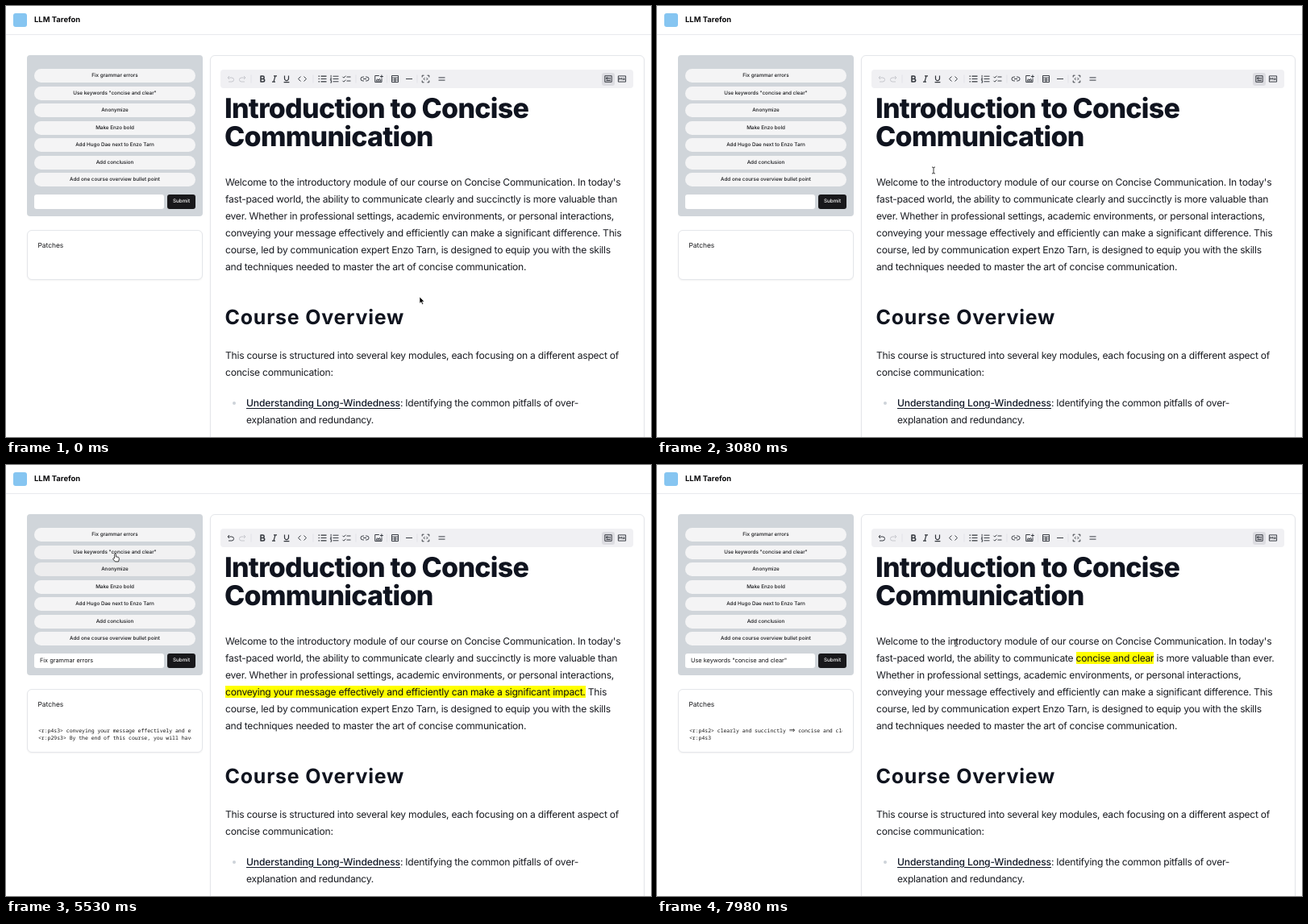
Recreate the animation shown at these times as an HTML page. Size 800x535 px, loop 8000 ms.

```html
<!DOCTYPE html>
<html lang="en">
<head>
<meta charset="utf-8">
<title>Editor demo</title>
<style>
  html, body { margin: 0; width: 100%; height: 100%; overflow: hidden; background: #fff; }
  #stage {
    position: absolute; left: 0; top: 0; width: 800px; height: 535px; overflow: hidden;
    font-family: Inter, "Open Sans", sans-serif; font-optical-sizing: none;
    text-rendering: geometricPrecision; color: #141518;
  }
  #stage div, #stage p, svg { position: absolute; box-sizing: border-box; margin: 0; }
  #stage div, #stage p { white-space: pre; }
  .card { background: #fff; border: 1px solid #e4e6ea; border-radius: 6px; box-shadow: 0 1px 2px #0000000d; }
  .pill { border-radius: 9px; font: 500 6.3px/17px Inter, sans-serif; text-align: center; }
  .body { font-size: 12.1px; line-height: 21px; letter-spacing: -.25px; color: #1a1c22; }
  .body mark { background: #ff0; color: #111; }
  .link { font-weight: 500; letter-spacing: -.13px; color: #111827; text-decoration: underline; text-underline-offset: 2px; }
  .h1 { font-weight: 800; font-size: 34px; line-height: 34.6px; letter-spacing: -.72px; color: #10141f; }
  .h2 { font-weight: 700; font-size: 25px; letter-spacing: .75px; color: #10141f; }
  .mono { font: 6.44px/8.5px "Noto Sans Mono", "Liberation Mono", monospace; overflow: hidden; color: #141414; }
  .mono span { display: inline-block; width: 7.73px; font: 9px/0 "DejaVu Sans", sans-serif; text-align: center; }
  path { fill: none; stroke: #30343b; stroke-width: .95; stroke-linejoin: round; }
</style>
</head>
<body>
<div id="stage"></div>
<script>
const LOOP = 8000;
const stage = document.getElementById("stage");
const clamp = v => Math.max(0, Math.min(1, v));

function add(tag, cls, css, html = "") {
  const el = document.createElement(tag);
  el.className = cls;
  el.style.cssText = css;
  el.innerHTML = html;
  stage.append(el);
  return el;
}
const box = (x, y, w, h, css = "", cls = "", html = "") =>
  add("div", cls, `left:${x}px;top:${y}px;width:${w}px;height:${h}px;${css}`, html);
// One line of text, centred vertically on y
const label = (x, y, html, css = "", cls = "") =>
  add("div", cls, `left:${x}px;top:${y - 15}px;line-height:30px;${css}`, html);
const para = (x, y, html, cls = "body") => add("p", cls, `left:${x}px;top:${y}px`, html);

// Header
box(0, 35, 800, 1, "background:#e8eaed");
box(9, 9, 17, 17, "background:#86c5f1;border-radius:3px");
label(35, 18, "LLM Tarefon", "font-size:9.45px;font-weight:700;color:#09090b");

// Prompt panel
box(26, 61, 217.5, 200, "background:#d0d5da;border-radius:4px");
const pills = [
  "Fix grammar errors", 'Use keywords "concise and clear"', "Anonymize", "Make Enzo bold",
  "Add Hugo Dae next to Enzo Tarn", "Add conclusion", "Add one course overview bullet point"
].map((s, i) => box(35, 78 + 21.5 * i, 200, 17, "", "pill", s));
box(35, 234, 161, 18, "background:#fff;border-radius:3px");
const input = label(42, 242.5, "", "font-size:7.35px");
box(200, 234, 35, 18, "background:#18181b;color:#fff;border-radius:3px", "pill", "Submit");

// Patches card
const card = box(26, 278, 217.5, 62, "", "card");
label(39.5, 298, "Patches", "font-size:8.4px");
const patches = box(40, 326.2, 189.8, 20, "", "mono");

// Document
box(252.5, 61, 539.5, 500, "", "card");
box(265.5, 79, 512.5, 23, "background:#f0f0f3;border-radius:4px");
box(739, 82.5, 16, 16, "background:#dcdce1;border-radius:3px");
para(271, 111.4, "Introduction to Concise\nCommunication", "h1");
const intro = para(272, 208, "");
label(271.5, 387, "Course Overview", "", "h2");
para(272, 422.5, "This course is structured into several key modules, each focusing on a different aspect of\nconcise communication:");
box(281, 490.5, 4, 4, "background:#cdd2d9;border-radius:2px");
para(298, 482, '<span class="link">Understanding Long-Windedness</span>: Identifying the common pitfalls of over-\nexplanation and redundancy.');

// Toolbar icons, each drawn around its centre
const rows = "M-2-3.3H5M-2 0H5M-2 3.3H5";
const icons = [
  [293.5, "M3.5-1.5H-1.5a2.5 2.5 0 000 5H2.5M1.5-3.5L3.5-1.5L1.5.5", "stroke:#c3c5cb"],
  [318, "M-2-3.4H.5a1.65 1.65 0 010 3.3H-2zM-2-.1H.9a1.75 1.75 0 010 3.5H-2z", "stroke-width:1.5"],
  [333, "M-1-3.6H3M-3 3.6H1M1-3.6L-1 3.6", "stroke-width:1.2"],
  [348, "M-2.5-4V-.4a2.5 2.5 0 005 0V-4M-3.4 4.2H3.4", "stroke-width:1.2"],
  [367.5, "M-2-3L-5 0L-2 3M2-3L5 0L2 3"],
  [392.5, rows + "M-5-3.3h1.5M-5 0h1.5M-5 3.3h1.5", "stroke-width:1.2"],
  [407.5, rows + "M-4.4-4.6v2.4M-5.2-1.1h1.4l-1.4 2.1h1.5M-5.2 2.2h1.3v2.4h-1.3"],
  [422.5, "M0-2.5H5M0 2.5H5M-5-2.7l1.4 1.4l2.5-2.5M-5 2.3l1.4 1.4l2.5-2.5"],
  [445, "M-1-2.4H-2.6a2.4 2.4 0 000 4.8H-1M1-2.4H2.6a2.4 2.4 0 010 4.8H1M-2 0H2"],
  [462, "M.8-4H-4.3V4H4V-.3M-3 2.5L-1.4.2L0 1.6L1.4-.2L3 2.5zM3.9-5v4M1.9-3h4"],
  [482.5, "M-4-4H4V4H-4zM-4-1.3H4M-4 1.4H4M0-1.3V4"],
  [500, "M-4 0H4"],
  [520.5, "M-4.3-2V-4.3H-2M2-4.3H4.3V-2M4.3 2V4.3H2M-2 4.3H-4.3V2M-1-1.5L-2.4 0L-1 1.5M1-1.5L2.4 0L1 1.5"],
  [540.5, "M-4-1.6H4M-4 1.6H4"],
  [747, "M-4.2-3.8H4.2V3.8H-4.2zM-2.5-1.6H0V.2H-2.5zM1.3-1.4H2.8M1.3.1H2.8M-2.5 2H2.8"],
  [764, "M-4.6-3.6H4.6V3.6H-4.6zM-3 1.6V-1.5L-1.5.1L0-1.5V1.6M2.4-1.6V1.3M1.2.2L2.4 1.5L3.6.2"]
];
const path = (x, y, d, css = "") => `<path transform="translate(${x} ${y})" d="${d}" style="${css}"/>`;
const dividers = [304, 381, 434, 472.5, 510].map(x => path(x, 90.5, "M0-5V5", "stroke:#e2e2e7")).join("");
const svg = add("div", "", "left:0;top:0",
  `<svg width="800" height="535">${dividers}
  <g id="undo">${path(278.5, 90.5, "M-3.5-1.5H1.5a2.5 2.5 0 010 5H-2.5M-1.5-3.5L-3.5-1.5L-1.5.5", "stroke:inherit")}</g>
  ${icons.map(([x, d, css]) => path(x, 90.5, d, css)).join("")}
  <g id="cursor"></g></svg>`);
const undo = svg.querySelector("#undo");
const cursor = svg.querySelector("#cursor");

const pointers = {
  arrow: path(0, 0, "M0 0V8.2L1.9 6.5L3.2 9.4L4.6 8.8L3.3 5.9H5.9z", "fill:#000;stroke:#fff;stroke-width:.6"),
  hand: path(0, 0, "M-.9 5.2V.6a.9.9 0 011.8 0V3.3L3.8 3.9a1.2 1.2 0 01.9 1.2V7.2L3.9 9.4H-.1L-2.7 6.3a.8.8 0 011.2-1z",
    "fill:#fff;stroke:#111;stroke-width:.8"),
  beam: path(0, 0, "M-2-4Q0-4 0-3V3Q0 4-2 4M2-4Q0-4 0-3M0 3Q0 4 2 4", "stroke:#222;stroke-width:.9")
};

// Pointer track: time, x, y
const track = [
  [70, 513, 361], [700, 400, 262], [980, 400, 262], [1750, 150, 88], [2480, 150, 88],
  [3060, 343, 204], [5250, 343, 204], [5530, 135.5, 110.5], [5740, 129.5, 108.5],
  [7000, 129.5, 108.5], [7560, 371, 221]
];
const kinds = [
  [0, "arrow"], [1940, "hand"], [2560, "arrow"], [2780, "beam"], [5370, "arrow"],
  [5430, "hand"], [7120, "arrow"], [7270, "beam"]
];
// Hovered pill: index, from, to
const hovers = [[0, 1940, 2540], [2, 5400, 5480], [1, 5500, 7090]];

function pointerAt(t) {
  const i = track.findIndex(k => k[0] > t);
  if (i === 0) return track[0].slice(1);
  if (i < 0) return track[track.length - 1].slice(1);
  const [t0, x0, y0] = track[i - 1], [t1, x1, y1] = track[i];
  const u = (t - t0) / (t1 - t0), e = u * u * (3 - 2 * u);
  return [x0 + (x1 - x0) * e, y0 + (y1 - y0) * e];
}

function introText(clear, impact) {
  const end = clear ? "<mark>concise and clear</mark> is more valuable than ever.\n"
    : "clearly and succinctly is more valuable than\never. ";
  const line = "conveying your message effectively and efficiently can make a significant ";
  return "Welcome to the introductory module of our course on Concise Communication. In today's\n" +
    "fast-paced world, the ability to communicate " + end +
    "Whether in professional settings, academic environments, or personal interactions,\n" +
    (impact ? `<mark>${line}impact.</mark>` : line + "difference.") + " This\n" +
    "course, led by communication expert Enzo Tarn, is designed to equip you with the skills\n" +
    "and techniques needed to master the art of concise communication.";
}

// Streamed lines: start, ms per token, text
const runs = [
  [[3230, 18, "<r:p4s3> conveying your message effectively and efficiently"],
   [3500, 21, "<r:p29s3> By the end of this course, you will have"]],
  [[7260, 33, "<r:p4s2> clearly and succinctly ⇒ concise and clear"],
   [7770, 28, "<r:p4s3> conveying"]]
];
function stream(t, [start, step, text]) {
  const [id, ...words] = text.split(" ");
  const tokens = [...id, ...words.map(w => " " + w)];
  return tokens.slice(0, Math.max(0, Math.floor((t - start) / step))).join("")
    .replace("<", "&lt;").replace("⇒", "<span>⇒</span>");
}

function put(el, html) {
  if (el.shown !== html) el.innerHTML = el.shown = html;
}

function draw(t) {
  const second = t >= 7220;
  const sent = t >= 3220;
  put(input, second ? 'Use keywords "concise and clear"' : sent ? "Fix grammar errors" : "");
  put(patches, runs[second ? 1 : 0].map(r => stream(t, r)).join("\n"));
  card.style.height = (sent ? 79 : 62) + "px";
  put(intro, introText(t >= 7760, t >= 3500 && !second));
  undo.style.stroke = t >= 3500 ? "#30343b" : "#c3c5cb";

  pills.forEach((p, n) => {
    let h = 0;
    for (const [i, from, to] of hovers)
      if (i === n) h += clamp((t - from) / 150) - clamp((t - to) / 150);
    const v = 244 - 14 * clamp(h);
    p.style.background = `rgb(${v},${v},${v + 1})`;
  });

  const [x, y] = pointerAt(t);
  put(cursor, pointers[kinds.filter(k => k[0] <= t).pop()[1]]);
  cursor.setAttribute("transform", `translate(${x} ${y})`);
}

const begin = performance.now();
function tick() {
  draw((performance.now() - begin) % LOOP);
  requestAnimationFrame(tick);
}
tick();
</script>
</body>
</html>
```
